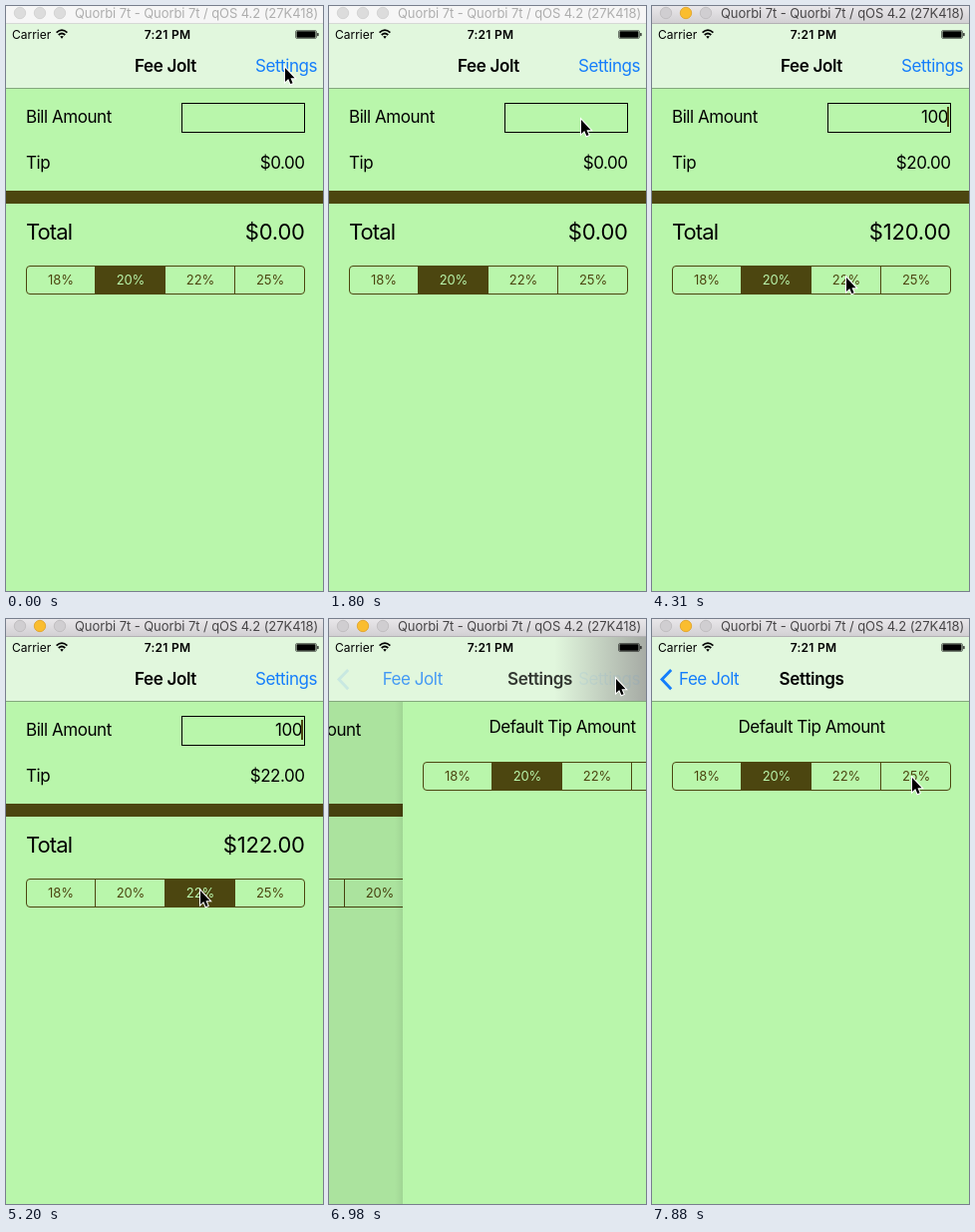
Animation, 318 px wide and 586 px high, one loop 8 s. Source, as an HTML page:

```html
<!DOCTYPE html>
<html lang="en">
<head>
<meta charset="utf-8">
<title>Tip calculator</title>
<style>
  html, body { margin: 0; width: 100%; height: 100%; overflow: hidden; background: #b9f6ab; }
  svg { display: block; width: 318px; height: 586px; overflow: hidden; }
  text { font: 17px Inter, sans-serif; letter-spacing: -.45px; white-space: pre; }
  .big { font-size: 22px; letter-spacing: -.9px; }
  .sum { font-size: 22px; letter-spacing: -.2px; }
  .bold { font-weight: 600; letter-spacing: -.35px; }
  .mid { text-anchor: middle; }
  .end { text-anchor: end; }
  .blue { fill: #157efb; }
  .seg text { font-size: 13px; letter-spacing: -.1px; text-anchor: middle; fill: #4c4610; }
  .seg text.on { fill: #b9f6ab; }
  .status { font-size: 12px; letter-spacing: 0; }
  .clock { letter-spacing: .25px; }
  .window { font-size: 13px; letter-spacing: -.08px; }
</style>
</head>
<body>
<svg viewBox="0 0 318 586">
  <defs>
    <linearGradient id="chrome" x2="0" y2="1">
      <stop stop-color="#e9e7ea"/><stop offset="1" stop-color="#d2d0d3"/>
    </linearGradient>
    <linearGradient id="fade">
      <stop stop-color="#7f787f" stop-opacity="0"/><stop offset="1" stop-color="#7f787f" stop-opacity=".6"/>
    </linearGradient>
    <linearGradient id="edge">
      <stop stop-opacity="0"/><stop offset="1" stop-opacity=".06"/>
    </linearGradient>
  </defs>

  <g id="home">
    <rect y="82" width="320" height="504" fill="#b9f6ab"/>
    <text x="20" y="117">Bill Amount</text>
    <rect x="176.5" y="97.5" width="123" height="29" fill="none" stroke="#000"/>
    <text id="bill" class="end" x="297" y="117"></text>
    <rect id="caret" x="296" y="101" width="2" height="20" fill="#4c4610"/>
    <text x="20" y="163">Tip</text>
    <text id="tip" class="end" x="299.6" y="163"></text>
    <rect y="185" width="320" height="13" fill="#4c4610"/>
    <text class="big" x="20" y="234">Total</text>
    <text id="total" class="sum end" x="299.8" y="234"></text>
    <g id="rates" class="seg" transform="translate(20 260)"></g>
    <rect id="dim" y="82" width="320" height="504"/>
  </g>

  <g id="prefs">
    <rect x="-8" y="82" width="8" height="504" fill="url(#edge)"/>
    <rect y="82" width="320" height="504" fill="#b9f6ab"/>
    <text class="mid" x="160" y="114">Default Tip Amount</text>
    <g id="defaults" class="seg" transform="translate(20 143)"></g>
  </g>

  <rect y="17" width="318" height="65" fill="#e1f7dd"/>
  <rect id="smear" y="17" width="92" height="65" fill="url(#fade)"/>
  <rect y="82" width="318" height="1" fill="#84a87d"/>

  <text class="status" x="6" y="32.5">Carrier</text>
  <g fill="none" stroke="#000" stroke-width="1.7">
    <path d="M50.6 26.6Q56 21.6 61.4 26.6M52.7 29Q56 26 59.3 29"/>
    <path d="M54.2 30.6Q56 29.2 57.8 30.6L56 32.8Z" fill="#000" stroke="none"/>
  </g>
  <text class="status bold clock mid" x="162" y="32.5">7:21 PM</text>
  <rect x="290.5" y="24.5" width="21" height="8" rx="1.5" fill="none" stroke="#000" stroke-opacity=".5"/>
  <rect x="291.5" y="25.3" width="19" height="6.4" rx=".8"/>
  <rect x="312.3" y="27" width="1.2" height="3.2" rx=".6"/>

  <text id="title" class="bold mid" x="160" y="66">Fee Jolt</text>
  <text id="link" class="blue end" x="312" y="66">Settings</text>
  <path id="chevron" d="M19.2 51L10 60.6L19.2 70.2" fill="none" stroke="#157efb" stroke-width="2.9"/>
  <text id="back" class="blue" x="27" y="66">Fee Jolt</text>
  <text id="title2" class="bold mid" x="160" y="66">Settings</text>

  <rect id="bar" width="318" height="17"/>
  <rect id="rule" y="17" width="318" height="1"/>
  <g id="lights" stroke-width=".8">
    <circle cx="14" cy="7" r="5.7"/><circle cx="34" cy="7" r="5.7"/><circle cx="54" cy="7" r="5.7"/>
  </g>
  <text id="name" class="window" x="69" y="12">Quorbi 7t - Quorbi 7t / qOS 4.2 (27K418)</text>

  <g id="cursor">
    <circle id="ring" cx="2.5" cy=".5" r="9" fill="none" stroke="#444" stroke-width="2"/>
    <path d="M1 .9V14.9L4.2 12L6.4 17.1L8.6 16.2L6.5 11.2H10.6Z" stroke="#fff" stroke-width="2" paint-order="stroke"/>
  </g>
</svg>

<script>
const LOOP = 8000, STEP = 148.5; // the screen refreshes once per step
const $ = id => document.getElementById(id);
const set = (id, attrs) => { for (const k in attrs) $(id).setAttribute(k, attrs[k]); };
const shift = (id, x, y = 0) => set(id, { transform: `translate(${x} ${y})` });
const clamp = v => Math.min(1, Math.max(0, v));
const smooth = k => k * k * (3 - 2 * k);

// Moments of the story, in steps
const CLICK = 13, FOCUS = 17, KEY = 18, TYPED = 20, IDLE = 24,
      TOUCH = 30, PRESS = 31, PICK = 32, OPEN = 44, DONE = 50;

// Pointer strokes after the start point: from step, to step, x, y
const start = [279, 61];
const strokes = [[1, 4, 174, 184], [6, 8, 186, 241], [8, 12, 252, 113],
  [23, 29, 194, 271], [36, 42, 287, 59], [49, 53, 260, 158]];

const pointer = n => strokes.reduce(([x, y], [a, b, tx, ty]) => {
  const k = smooth(clamp((n - a) / (b - a)));
  return [x + (tx - x) * k, y + (ty - y) * k];
}, start);

// Six-step blink that stays lit while typing
function caret(n) {
  if (n < IDLE) return n >= FOCUS ? 1 : 0;
  return (Math.abs(n % 6 - 2.5) - .5) / 2;
}

// Critically damped spring
function push(n) {
  const s = Math.max(0, n * STEP - 6700) / 100;
  return n >= DONE ? 1 : 1 - (1 + s) * Math.exp(-s);
}

function segments(id, on, pressed) {
  let s = `<rect x=".5" y=".5" width="279" height="28" rx="3.5" fill="none" stroke="#4c4610"/>`;
  [18, 20, 22, 25].forEach((rate, i) => {
    const x = i * 70;
    if (i === on || i === pressed)
      s += `<rect x="${x}" width="70" height="29" fill="#4c4610" opacity="${i === on ? 1 : .2}"/>`;
    if (i) s += `<path d="M${x - .5} 0V29" stroke="#4c4610"/>`;
    s += `<text x="${x + 35}" y="19" class="${i === on ? 'on' : ''}">${rate}%</text>`;
  });
  $(id).innerHTML = s;
}

function drawWindow(active) {
  set('bar', { fill: active ? 'url(#chrome)' : '#f6f6f6' });
  set('rule', { fill: active ? '#b3b1b4' : '#d5d9d4' });
  set('name', { fill: active ? '#474547' : '#aeaeae' });
  [...$('lights').children].forEach((dot, i) => {
    const lit = active && i === 1;
    dot.setAttribute('fill', lit ? '#fabd2f' : active ? '#d0ced1' : '#dcdcdc');
    dot.setAttribute('stroke', lit ? '#dfa023' : active ? '#bbb9bc' : '#cecece');
  });
}

function drawHome(n) {
  const bill = n < KEY ? 0 : n < TYPED ? 1 : 100;
  const picked = n >= PICK;
  const tip = bill * (picked ? .22 : .2);
  $('bill').textContent = bill || '';
  $('tip').textContent = '$' + tip.toFixed(2);
  $('total').textContent = '$' + (bill + tip).toFixed(2);
  set('caret', { opacity: caret(n) });
  segments('rates', picked ? 2 : 1, n === PRESS ? 2 : -1);
}

function drawPush(n) {
  const p = push(n), rest = 1 - p;
  shift('home', Math.round(-96 * p));
  shift('prefs', p ? Math.round(320 * rest) : 340);
  set('dim', { opacity: .1 * p });
  set('smear', { x: 300 - 96 * p, opacity: p > 0 && p < 1 ? 1 : 0 });
  shift('title', -88 * p);
  set('title', { opacity: clamp(1 - 1.3 * p) });
  set('link', { opacity: (n >= OPEN ? .3 : 1) * rest });
  shift('back', 115 * rest);
  set('back', { opacity: p });
  set('chevron', { opacity: p ** 8 });
  shift('title2', 222 * rest);
  set('title2', { opacity: p });
}

let shown = -1;
function draw() {
  const n = Math.floor(performance.now() % LOOP / STEP);
  if (n !== shown) {
    shown = n;
    drawWindow(n >= CLICK);
    drawHome(n);
    drawPush(n);
    shift('cursor', ...pointer(n).map(Math.round));
    set('ring', { opacity: [CLICK, TOUCH, OPEN].includes(n) ? 1 : 0 });
  }
  requestAnimationFrame(draw);
}

segments('defaults', 1, -1);
draw();
</script>
</body>
</html>
```
